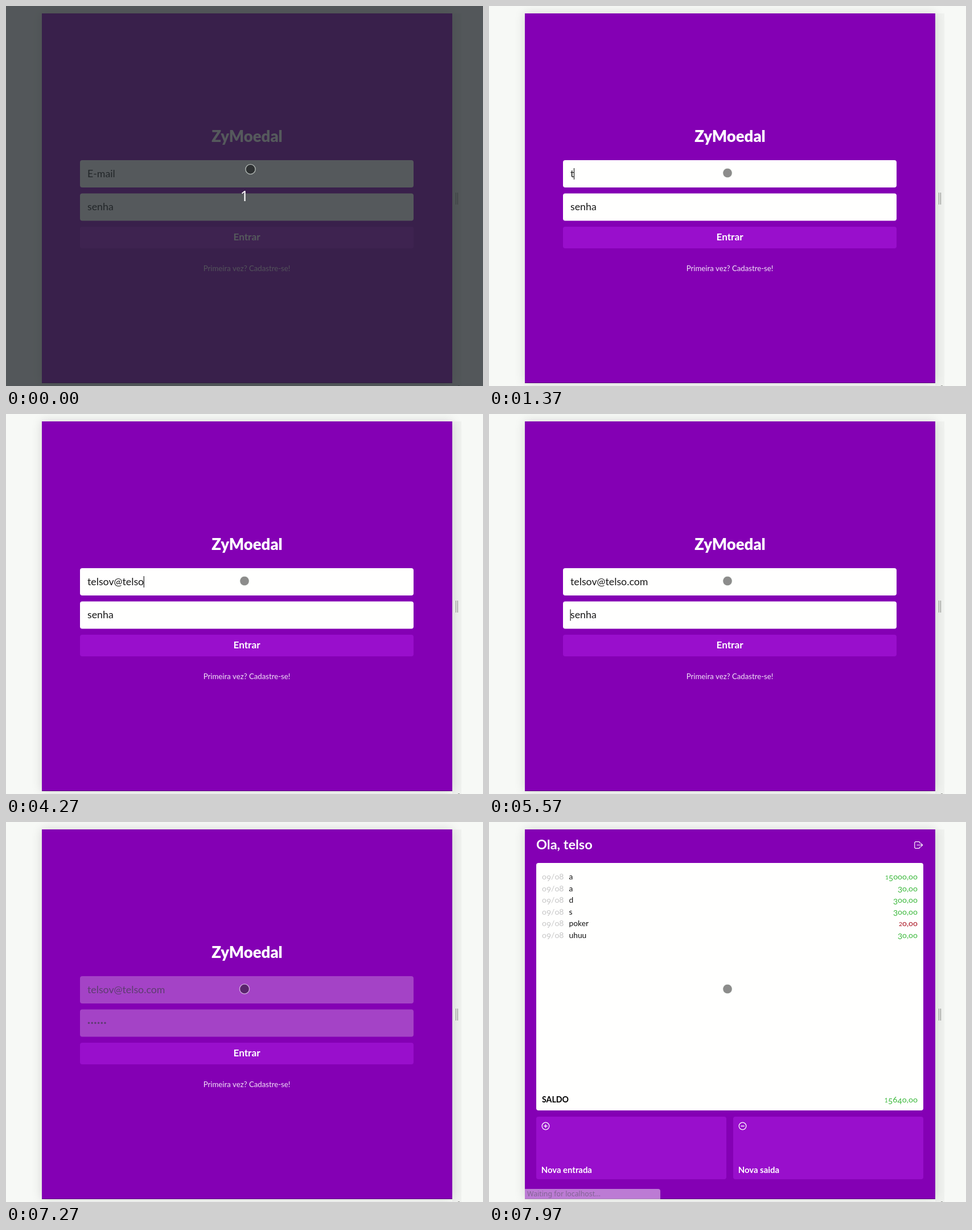
Write an HTML page with a canvas that moves like this. It is 838 px wide and 668 px high and loops after 8000 ms.

```html
<!DOCTYPE html>
<html lang="pt">
<head>
<meta charset="utf-8">
<title>ZyMoedal</title>
<style>
html, body { margin: 0; width: 838px; height: 668px; overflow: hidden; background: #f7f9f6; }
canvas { display: block; }
</style>
</head>
<body>
<canvas id="stage" width="838" height="668"></canvas>
<script>
const ctx = document.getElementById('stage').getContext('2d');
const LOOP = 8000;
const SANS = 'Lato, "Open Sans", sans-serif';
const PURPLE = '#8400b4', BUTTON = '#990fcc', WHITE = '#fffffe';
const GREEN = '#3ab83a', RED = '#a8101e';

// '<' is a backspace
const KEYS = 'telsoc<v@telso.com';
const KEY_TIMES = [1370, 1600, 1670, 1770, 1830, 2200, 2570, 2730, 3430, 3730,
  3970, 4070, 4170, 4270, 5070, 5170, 5270, 5470];
const DOT_TIMES = [6400, 6470, 6570, 6770, 6830, 6970];
const POINTER = [[0, 429.5, 287], [200, 430, 293.5], [470, 427, 293.5],
  [570, 422, 293.5], [630, 419, 293.5]];
const ROWS = [['a', '15000,00', GREEN], ['a', '30,00', GREEN], ['d', '300,00', GREEN],
  ['s', '300,00', GREEN], ['poker', '20,00', RED], ['uhuu', '30,00', GREEN]];

const passed = (times, t) => times.filter(x => x <= t).length;
const within = (t, a, b) => t >= a && t < b;

function box(x, y, w, h, fill, r = 4) {
  ctx.fillStyle = fill;
  ctx.beginPath();
  ctx.roundRect(x, y, w, h, r);
  ctx.fill();
}

function text(str, x, y, size, color, weight = 400, align = 'left', family = SANS) {
  ctx.font = `${weight} ${size}px ${family}`;
  ctx.textAlign = align;
  ctx.fillStyle = color;
  ctx.fillText(str, x, y);
  return ctx.measureText(str).width;
}

// Old-style figures: 0 1 2 at x-height, 3 4 5 7 9 hang below the baseline
function figures(str, x, y, size, color, right = false) {
  const glyphs = [...str].map(c => {
    const low = '12'.includes(c);
    const g = { c: c === '0' ? 'o' : c, size: low ? size * 0.74 : size,
      drop: '34579'.includes(c) ? size * 0.19 : 0 };
    ctx.font = `400 ${g.size}px ${SANS}`;
    g.w = ctx.measureText(g.c).width;
    return g;
  });
  if (right) x -= glyphs.reduce((sum, g) => sum + g.w, 0);
  for (const g of glyphs) {
    text(g.c, x, y + g.drop, g.size, color);
    x += g.w;
  }
}

function lines(color, width, ...paths) {
  ctx.strokeStyle = color;
  ctx.lineWidth = width;
  ctx.lineCap = ctx.lineJoin = 'round';
  ctx.beginPath();
  for (const p of paths)
    for (let i = 0; i < p.length; i += 2)
      i ? ctx.lineTo(p[i], p[i + 1]) : ctx.moveTo(p[i], p[i + 1]);
  ctx.stroke();
}

function frame() {
  ctx.fillStyle = '#f7f9f6';
  ctx.fillRect(0, 0, 838, 668);
  box(784, 13, 16, 655, '#f0f2ef', 0);
  ctx.save();
  ctx.shadowColor = 'rgba(0,0,0,.14)';
  ctx.shadowBlur = 18;
  box(63, 13, 721, 650, PURPLE, 0);
  ctx.restore();
  box(63, 13, 721, 650, PURPLE, 0);
  box(63, 662, 721, 1, '#5c007e', 0);
  box(790, 328, 1, 21, '#858783', 0);
  box(793, 328, 1, 21, '#858783', 0);
  box(794, 667, 3, 1, '#9a9c98', 0);
}

function caret(x, y) {
  box(x - 0.5, y, 1.2, 20, '#222', 0);
}

function login(t) {
  const off = t >= 7270;
  const field = off ? '#a443c6' : WHITE;
  const ink = off ? '#5d3d70' : '#181818';

  text('ZyMoedal', 423.5, 239, 27.5, '#fff', 900, 'center');
  box(130, 271, 586, 48, field);
  box(130, 329.5, 586, 48, field);
  box(130, 388, 586, 38, BUTTON);
  text('Entrar', 423, 412, 17.2, '#fff', 700, 'center');
  text('Primeira vez? Cadastre-se!', 423, 465.5, 13.2, '#f3e3f8', 400, 'center');

  let mail = '';
  for (const k of KEYS.slice(0, passed(KEY_TIMES, t)))
    mail = k === '<' ? mail.slice(0, -1) : mail + k;
  const w = text(mail || 'E-mail', 143, 301, 17.8, ink);
  if (within(t, 400, 5570)) caret(143 + (mail ? w : 0), 285);

  const dots = passed(DOT_TIMES, t);
  if (!dots) text('senha', 143, 359.3, 17.8, ink);
  for (let i = 0; i < dots; i++) box(143.8 + i * 5.7, 351.6, 3.4, 3.4, ink, 1.7);
  if (within(t, 5570, 7270)) caret(143 + dots * 5.7, 343.5);
}

function action(x, label, plus) {
  box(x, 518, 334, 110, BUTTON);
  const cx = x + 16.5, cy = 534.5;
  ctx.strokeStyle = '#fff';
  ctx.lineWidth = 1.3;
  ctx.beginPath();
  ctx.arc(cx, cy, 6.3, 0, 7);
  ctx.stroke();
  lines('#fff', 1.3, [cx - 2.7, cy, cx + 2.7, cy]);
  if (plus) lines('#fff', 1.3, [cx, cy - 2.7, cx, cy + 2.7]);
  text(label, x + 8.7, 617, 14.9, '#fff', 700);
}

function wallet(t) {
  text('Ola, telso', 83, 48, 23.5, '#fff', 700);
  lines('#fff', 1.2, [757, 37.5, 757, 36, 755.5, 34.6, 749.3, 34.6, 747.8, 36, 747.8, 45,
    749.3, 46.4, 755.5, 46.4, 757, 45, 757, 43.5], [752, 40.5, 761.5, 40.5],
    [758.8, 37.7, 761.6, 40.5, 758.8, 43.3]);
  box(83, 72, 680, 435, WHITE);
  if (t >= 7700) {
    ROWS.forEach(([name, sum, color], i) => {
      const y = 101 + i * 20.5;
      figures('09/08', 93, y, 14, '#c6c6c6');
      text(name, 140.5, y, 13.8, '#111');
      figures(sum, 753, y, 14, color, true);
    });
    text('SALDO', 93, 493, 14.2, '#000', 700);
    figures('15640,00', 753, 493, 14.2, GREEN, true);
  }
  action(83, 'Nova entrada', true);
  action(429, 'Nova saida', false);

  ctx.globalAlpha = t < 7900 ? 1 : t < 7970 ? 0.78 : 0.5;
  box(63, 645, 238, 18, '#f5f5f5', [0, 4, 0, 0]);
  text('Waiting for localhost…', 67, 658, 12.3, '#4a4e55', 400, 'left', '"Noto Sans", sans-serif');
  ctx.globalAlpha = 1;
}

function moveIcon(x, y) {
  lines('#111', 1.5, [x - 5, y, x + 5, y], [x, y - 5, x, y + 5]);
  for (let i = 0; i < 4; i++) {
    ctx.save();
    ctx.translate(x, y);
    ctx.rotate(i * Math.PI / 2);
    ctx.fillStyle = '#111';
    ctx.beginPath();
    ctx.moveTo(6.5, 0);
    ctx.lineTo(3.4, -3);
    ctx.lineTo(3.4, 3);
    ctx.fill();
    ctx.restore();
  }
}

function pointer(t) {
  const [, x, y] = POINTER[passed(POINTER.map(p => p[0]), t) - 1];
  if (within(t, 2030, 2400) || within(t, 3030, 3530)) return moveIcon(x - 0.5, y);
  ctx.beginPath();
  ctx.arc(x, y, 8, 0, 7);
  ctx.fillStyle = 'rgba(0,0,0,.45)';
  ctx.fill();
  ctx.beginPath();
  ctx.arc(x, y, 8.6, 0, 7);
  ctx.strokeStyle = 'rgba(245,255,245,.55)';
  ctx.lineWidth = 1.4;
  ctx.stroke();
}

function draw(t) {
  frame();
  t < 7630 ? login(t) : wallet(t);
  if (t < 100) {
    ctx.fillStyle = 'rgba(37,42,46,.775)';
    ctx.fillRect(0, 0, 838, 668);
    text('1', 419, 343, 25, '#fff', 400, 'center', '"Noto Sans", sans-serif');
  }
  pointer(t);
}

const start = performance.now();
function tick() {
  draw((performance.now() - start) % LOOP);
  requestAnimationFrame(tick);
}
tick();
</script>
</body>
</html>
```
